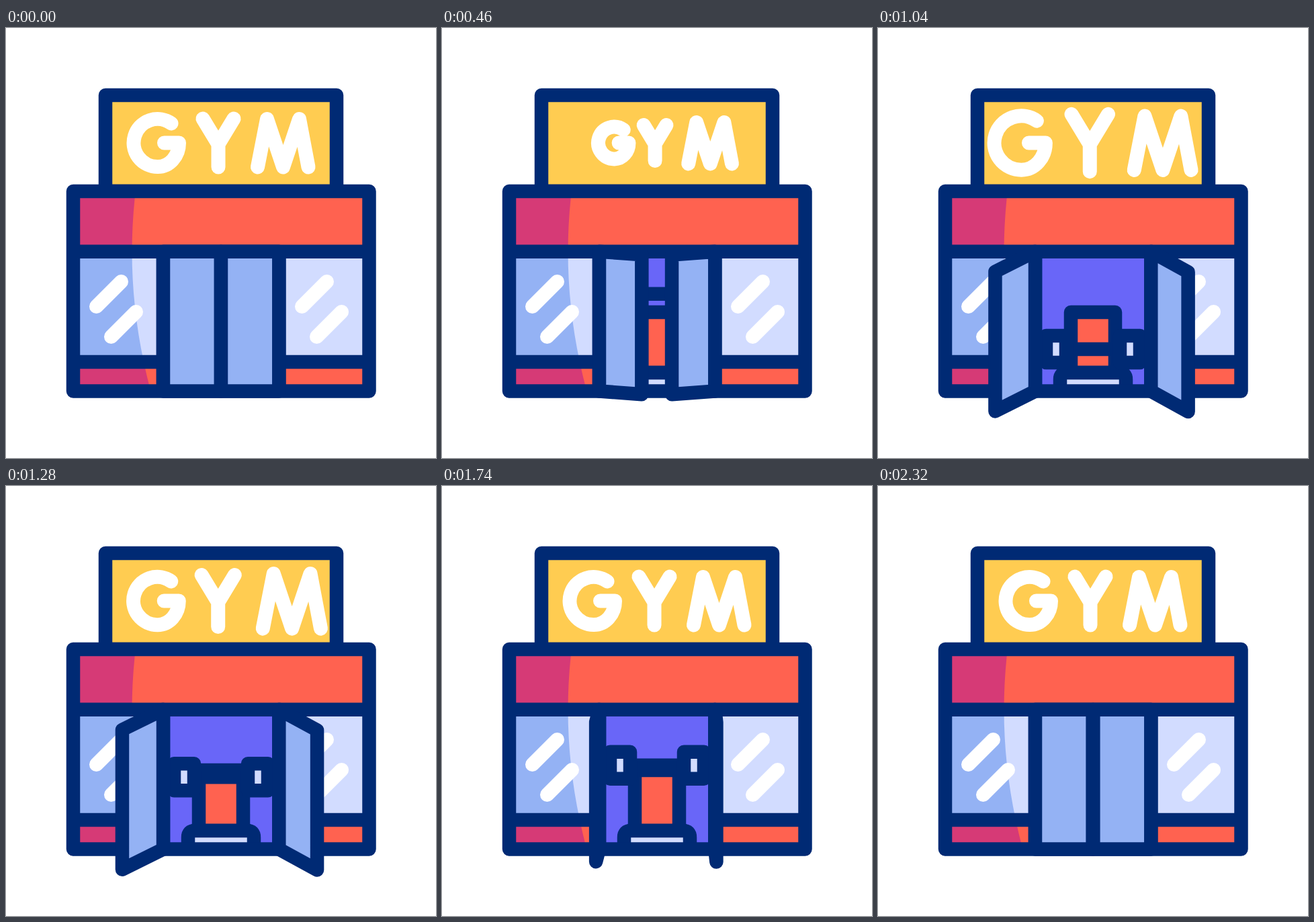
Write an HTML page that moves like this. It is 640 by 640 pixels and loops after 2400 ms.

```html
<!DOCTYPE html>
<html lang="en">
<head>
<meta charset="utf-8">
<title>Gym</title>
<style>
  html, body { margin: 0; width: 100%; height: 100%; overflow: hidden; background: #fff; }
  svg { display: block; width: 100vw; height: 100vh; }
  .line { stroke: #002a74; stroke-width: 20.5; stroke-linejoin: round; fill: none; }
  .white { stroke: #fff; stroke-width: 21; stroke-linecap: round; stroke-linejoin: round; fill: none; }
  .red { fill: #ff6250; }
  .pink { fill: #d63a76; }
  .blue { fill: #94b2f4; }
  .light { fill: #d2dcff; }
  .yellow { fill: #ffcc51; }
  .purple { fill: #6966f8; }
</style>
</head>
<body>
<svg viewBox="0 0 640 640">
  <defs>
    <path id="shade" d="M100 253H191.7Q177.3 391.5 212.7 530V541H100Z"/>
    <clipPath id="pane"><path d="M100 333H234V497H100Z"/></clipPath>
    <path id="shine" d="M134.5 414.5L171.5 377.5M156.5 459.5L193.5 422.5"/>
  </defs>

  <!-- sign -->
  <rect class="line yellow" x="148" y="100" width="344" height="143"/>
  <g id="word">
    <path class="white" d="M246 142A35.5 35.5 0 1 0 226 206.5A31.5 35.5 0 0 0 257.5 171H235.5"/>
    <path class="white" d="M293 135L316 173L339 135M316 173V207"/>
    <path class="white" d="M374.5 207L388.5 135.5L412.5 207L436.5 135.5L450 207"/>
  </g>

  <!-- facade -->
  <rect class="red" x="100" y="243" width="440" height="297"/>
  <use href="#shade" class="pink"/>
  <path class="light" d="M100 333H234V497H100ZM406 333H540V497H406Z"/>
  <use href="#shade" class="blue" clip-path="url(#pane)"/>
  <use href="#shine" class="white"/>
  <use href="#shine" class="white" x="306"/>

  <!-- room -->
  <rect class="purple" x="234" y="333" width="172" height="207"/>
  <rect class="line red" x="287" y="423" width="66" height="90"/>
  <path class="line light" d="M271 540V523Q271 513 281 513H359Q369 513 369 523V540"/>
  <g id="barbell">
    <path class="line" d="M280 0H360"/>
    <path class="line light" d="M250 -20H280V20H250ZM360 -20H390V20H360Z"/>
  </g>

  <path class="line" d="M100 243H540.5V540.5H100ZM100 332.7H540M100 497H234M406.3 497H540M234 333V540M406.3 333V540"/>
  <path class="line blue door"/>
  <path class="line blue door"/>
</svg>
<script>
const LOOP = 2400;
const letters = [...document.querySelectorAll('#word path')];
const doors = [...document.querySelectorAll('.door')];
const barbell = document.getElementById('barbell');

const DELAYS = [0, 150, 260];
const BEAT = 440;
const SCALES = [1, 0.67, 1.185, 1];
// hinge x, sideways travel and drop of the free edge
const SWINGS = [[234, -147.5, 30.3], [406.3, 143.5, 31]];

const wave = u => (1 - Math.cos(Math.PI * u)) / 2;

// cubic-bezier(.79, 0, .265, 1), solved by bisection
function swing(u) {
  let lo = 0, hi = 1, s = 0.5;
  for (let i = 0; i < 24; i++) {
    s = (lo + hi) / 2;
    const r = 1 - s;
    const x = 3 * r * r * s * 0.79 + 3 * r * s * s * 0.265 + s * s * s;
    if (x < u) lo = s; else hi = s;
  }
  return s * s * (3 - 2 * s);
}

function pulse(t) {
  if (t <= 0 || t >= 3 * BEAT) return 1;
  const i = Math.floor(t / BEAT);
  return SCALES[i] + (SCALES[i + 1] - SCALES[i]) * wave(t / BEAT - i);
}

function draw(t) {
  letters.forEach((el, i) => {
    const s = pulse(t - DELAYS[i]);
    el.setAttribute('transform', `translate(320 171) scale(${s}) translate(-320 -171)`);
    el.style.strokeWidth = 21 / s;
  });

  const open = swing(1 - Math.abs(t / (LOOP / 2) - 1));
  doors.forEach((el, i) => {
    const [hinge, dx, dy] = SWINGS[i];
    const x = 320 + dx * open, y = dy * open;
    el.setAttribute('d', `M${hinge} 332.7L${x} ${332.7 + y}V${540.5 + y}L${hinge} 540.5Z`);
  });

  barbell.setAttribute('transform', `translate(0 ${394 + 86.3 * wave((t - 410) / 570)})`);
}

const start = performance.now();
function tick() {
  draw((performance.now() - start) % LOOP);
  requestAnimationFrame(tick);
}
draw(0);
requestAnimationFrame(tick);
</script>
</body>
</html>
```
